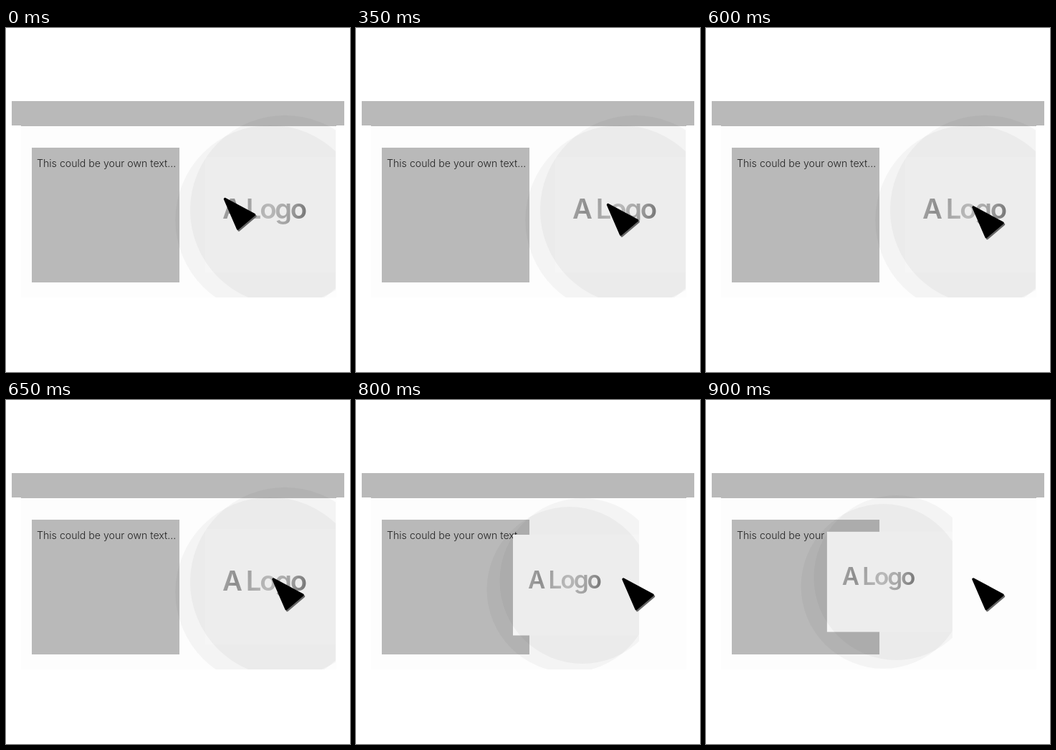
Write an HTML page that moves like this. It is 480x480 px and loops after 1200 ms.

```html
<!DOCTYPE html>
<html lang="en">
<head>
<meta charset="utf-8">
<title>Drag the logo</title>
<style>
html, body { margin: 0; height: 100%; overflow: hidden; background: #fff; }
svg { display: block; width: 100%; height: 100%; }
text { font-family: Inter, "Open Sans", sans-serif; }
.note { font-size: 14.15px; font-weight: 300; fill: #222; }
.logo { font-size: 33.5px; font-weight: 600; letter-spacing: -2.1px; fill: url(#metal); }
.disc { fill: #000; fill-opacity: .034; }
</style>
</head>
<body>
<svg viewBox="0 0 480 480">
  <defs>
    <linearGradient id="metal" gradientUnits="userSpaceOnUse" x1="-50" y1="-10" x2="50" y2="12">
      <stop offset="0" stop-color="#a6a6a6"/>
      <stop offset=".17" stop-color="#8c8c8c"/>
      <stop offset=".32" stop-color="#a6a6a6"/>
      <stop offset=".55" stop-color="#bababa"/>
      <stop offset=".78" stop-color="#a4a4a4"/>
      <stop offset="1" stop-color="#757575"/>
    </linearGradient>
    <clipPath id="page"><rect width="460" height="376"/></clipPath>
    <clipPath id="card"><rect x="-200" y="-200" width="304" height="400"/></clipPath>
    <path id="arrow" d="M1.5 1.5 42.5 23.5 19.5 43Z" stroke-width="3.5" stroke-linejoin="round"/>
  </defs>

  <rect x="21" y="137" width="440" height="239" fill="#fdfdfd"/>
  <path d="M8 102H472V136H461V137H21V136H8Z" fill="#b9b9b9"/>
  <rect x="36" y="167" width="206" height="188" fill="#b9b9b9"/>
  <text class="note" x="43" y="194">This could be your own text...</text>

  <g clip-path="url(#page)">
    <g id="badge" clip-path="url(#card)">
      <rect x="-72" y="-64.5" width="176" height="140.5" fill="#fff"/>
      <circle class="disc" cx="7" cy="12" r="115.5"/>
      <circle class="disc" cx="25" cy="0" r="115.5"/>
      <text class="logo" x="-51" y="10.5">A Logo</text>
    </g>
  </g>

  <g id="cursor">
    <use href="#arrow" x="1.5" y="2" fill="#666" stroke="#666"/>
    <use href="#arrow" fill="#000" stroke="#000"/>
  </g>
</svg>
<script>
const LOOP = 1200;
const badge = document.getElementById("badge");
const cursor = document.getElementById("cursor");

// [start ms, x, y]
const cursorSteps = [[0, 304, 237], [250, 328, 241], [350, 350, 245], [450, 371.5, 248.5]];
// [start ms, x, y, scale]
const badgeSteps = [
  [0, 360.5, 254, 1.145],
  [750, 310, 254, 1],
  [800, 291, 252.5, 1],
  [850, 272, 251, 1],
  [900, 240.5, 248, .995]
];

const stepAt = (steps, t) => steps.findLast(s => s[0] <= t);

function draw(now) {
  const t = now % LOOP;
  const [, cx, cy] = stepAt(cursorSteps, t);
  const [, bx, by, scale] = stepAt(badgeSteps, t);
  cursor.setAttribute("transform", `translate(${cx} ${cy})`);
  badge.setAttribute("transform", `translate(${bx} ${by}) scale(${scale})`);
}

const start = performance.now();
function tick() {
  draw(performance.now() - start);
  requestAnimationFrame(tick);
}
tick();
</script>
</body>
</html>
```
